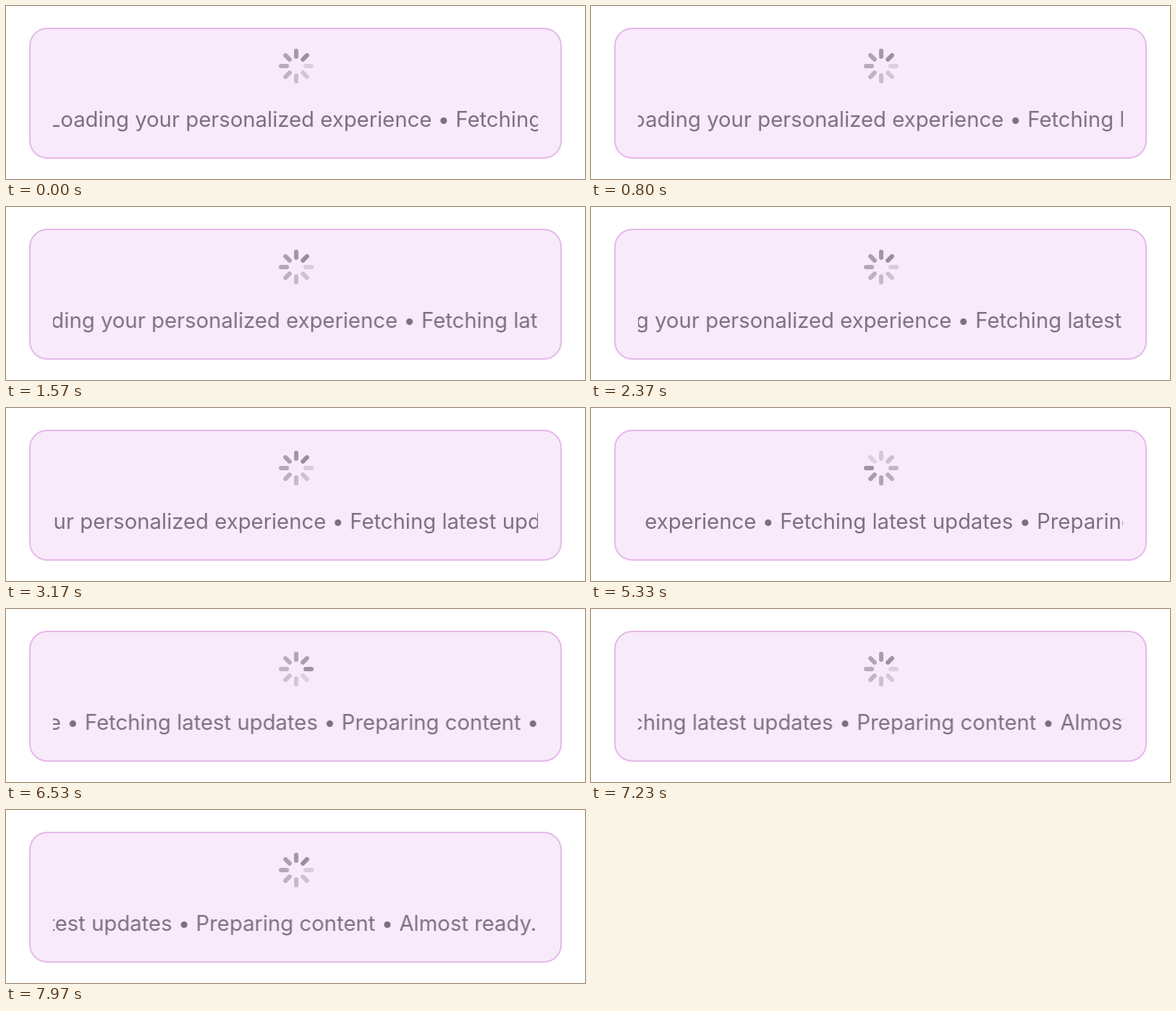
Animation, 800 px wide and 239 px high, one loop 8 s. Source, as an HTML page:

```html
<!DOCTYPE html>
<html lang="en">
<head>
<meta charset="utf-8">
<title>Loading banner</title>
<style>
  html, body { margin: 0; width: 100%; height: 100%; overflow: hidden; background: #fff; }
  .card {
    position: absolute; left: 32px; top: 29.5px; width: 736px; height: 181px;
    box-sizing: border-box; border: 2px solid #e6b8ea; border-radius: 25px;
    background: #f8e9fb;
  }
  .spinner { position: absolute; left: 376.5px; top: 59px; width: 48px; height: 48px; opacity: .65; }
  .leaf { position: absolute; left: 21px; width: 6px; height: 48px; }
  .leaf::before {
    content: ""; display: block; height: 14.4px; border-radius: 3px; background: #655868;
  }
  .ticker { position: absolute; left: 65px; top: 137px; width: 670px; height: 40px; overflow: hidden; }
  .message {
    position: absolute; left: 0; top: 0; white-space: pre; will-change: transform;
    font: 400 29.3px/40px Inter, sans-serif; color: #7d6f82;
  }
</style>
</head>
<body>
<div class="card"></div>
<div class="spinner"></div>
<div class="ticker"><div class="message">Loading your personalized experience • Fetching latest updates • Preparing content • Almost ready...</div></div>
<script>
  const LOOP = 8000;
  const SPIN = { period: 800, offset: 150, leaves: 8 };
  const SCROLL = { duration: 18000, offset: 840, distance: 1494 };

  const message = document.querySelector('.message');
  const spinner = document.querySelector('.spinner');
  const leaves = Array.from({ length: SPIN.leaves }, (_, i) => {
    const leaf = document.createElement('div');
    leaf.className = 'leaf';
    leaf.style.transform = `rotate(${i * 360 / SPIN.leaves}deg)`;
    return spinner.appendChild(leaf);
  });

  // cubic-bezier(.42, 0, .58, 1), solved for its parameter by bisection
  function easeInOut(x) {
    let low = 0, high = 1;
    for (let i = 0; i < 30; i++) {
      const s = (low + high) / 2;
      if (1.26 * s - 0.78 * s * s + 0.52 * s ** 3 < x) low = s; else high = s;
    }
    return low * low * (3 - 2 * low);
  }

  function draw(t) {
    leaves.forEach((leaf, i) => {
      const phase = (t + SPIN.offset) / SPIN.period - i / SPIN.leaves + 1;
      leaf.style.opacity = 1 - 0.75 * (phase % 1);
    });
    const x = SCROLL.distance * easeInOut((t + SCROLL.offset) / SCROLL.duration);
    message.style.transform = `translateX(${-x}px)`;
  }

  function frame() {
    draw(performance.now() % LOOP);
    requestAnimationFrame(frame);
  }
  frame();
</script>
</body>
</html>
```
